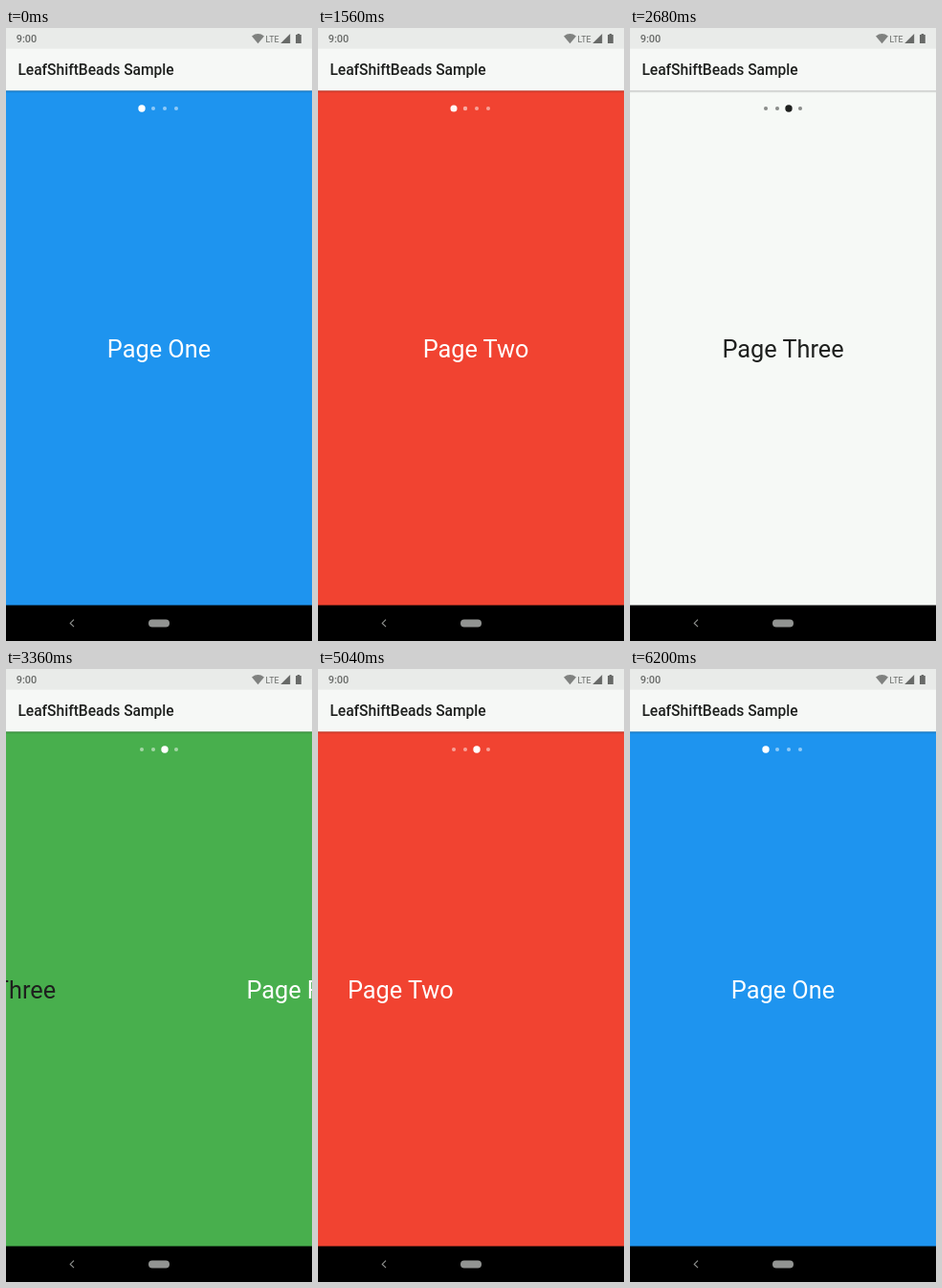
Write an HTML page that moves like this. It is 320 px wide and 640 px high and loops after 6.24 s.

```html
<!DOCTYPE html>
<html lang="en">
<head>
<meta charset="utf-8">
<title>Pager with dots</title>
<style>
  html, body { margin: 0; width: 100%; height: 100%; overflow: hidden; background: #000; }
  svg { display: block; width: 100%; height: 100%; }
  text { font-family: Roboto, "Noto Sans", sans-serif; }
  .page { font-size: 25.3px; text-anchor: middle; }
  .title { font-size: 15.57px; font-weight: 500; fill: #1d1f1d; }
  .status { font-weight: 500; fill: #686a68; }
</style>
</head>
<body>
<svg viewBox="0 0 320 640">
  <defs>
    <linearGradient id="shade" x2="0" y2="1">
      <stop offset="0" stop-opacity=".24"/>
      <stop offset="1" stop-opacity="0"/>
    </linearGradient>
  </defs>

  <rect id="back" y="65" width="320" height="538"/>
  <g id="pages"></g>
  <g id="dots"></g>

  <rect width="320" height="65.4" fill="#f6f8f6"/>
  <rect width="320" height="21.6" fill="#e9ebe9"/>
  <rect y="65.4" width="320" height="2.4" fill="url(#shade)"/>
  <text class="title" x="12.4" y="49.4">LeafShiftBeads Sample</text>

  <text class="status" x="10.8" y="15.3" font-size="10.9">9:00</text>
  <text class="status" x="271.6" y="14.5" font-size="8.8" style="font-weight:400">LTE</text>
  <g fill="#686a68">
    <path d="M257 8.4Q263.5 3.6 270 8.4L263.5 16.3Z" fill="#7f817f"/>
    <path d="M297.2 6V16H287.2Z"/>
    <path d="M304.6 6h2.6v1h1.6v9h-5.8v-9h1.6Z"/>
  </g>

  <rect y="602.6" width="320" height="37.4"/>
  <path d="M71 617.6L67.2 621.4L71 625.2" fill="none" stroke="#929492" stroke-width="1.1"/>
  <rect x="149" y="617.4" width="22" height="8" rx="4" fill="#929492"/>
</svg>
<script>
const LOOP = 6240, STEP = 40, WIDTH = 320, DOT_TIME = 300;

const pages = [
  { name: "Page One", back: "#1e94ef", ink: "#fff" },
  { name: "Page Two", back: "#f14331", ink: "#fff" },
  { name: "Page Three", back: "#f6f9f6", ink: "#1e201e" },
  { name: "Page Four", back: "#48af4d", ink: "#fff" }
];

// drag: share of the page width covered at each step until release
const swipes = [
  { from: 0, to: 1, start: 1440, end: 1800, drag: [.219, .6] },
  { from: 1, to: 2, start: 2320, end: 2680, drag: [.077, .48] },
  { from: 2, to: 3, start: 3280, end: 3680, drag: [.08, .28, .536] },
  { from: 3, to: 2, start: 4120, end: 4440, drag: [.4, .847] },
  { from: 2, to: 1, start: 4960, end: 5360, drag: [.06, .4, .77] },
  { from: 1, to: 0, start: 5840, end: 6200, drag: [.12, .55] }
];

const byId = id => document.getElementById(id);
const clamp = v => Math.min(1, Math.max(0, v));
const smooth = v => (1 - Math.cos(Math.PI * clamp(v))) / 2;

function add(parent, tag, attrs) {
  const el = document.createElementNS("http://www.w3.org/2000/svg", tag);
  for (const key in attrs) el.setAttribute(key, attrs[key]);
  return parent.appendChild(el);
}

const labels = pages.map(page => {
  const el = add(byId("pages"), "text", { class: "page", y: 343.9, fill: page.ink });
  el.textContent = page.name;
  return el;
});
const dots = pages.map((_, i) => add(byId("dots"), "circle", { cx: 142 + 12 * i, cy: 84 }));

// Follow the finger, then settle with a speed that matches the release.
function progress({ start, drag }, t) {
  const step = Math.round((t - start) / STEP);
  if (step < 0) return 0;
  if (step < drag.length) return drag[step];
  const last = drag.length - 1;
  const speed = (drag[last] - drag[last - 1]) / STEP;
  const rest = 1 - drag[last];
  const u = clamp((t - start - last * STEP) * speed / (4 * rest));
  return 1 - rest * (1 - u) ** 5;
}

function draw(t) {
  const swipe = swipes.findLast(s => t >= s.start) || swipes[0];
  const { from, to, end } = swipe;
  const pos = from + (to - from) * progress(swipe, t);
  const page = pages[Math.round(pos)];
  const picked = smooth((t - end + DOT_TIME) / DOT_TIME);

  byId("back").setAttribute("fill", page.back);
  byId("dots").setAttribute("fill", page.ink);
  labels.forEach((el, i) => el.setAttribute("x", WIDTH * (i - pos + .5)));
  dots.forEach((el, i) => {
    const on = i === to ? picked : i === from ? 1 - picked : 0;
    el.setAttribute("r", 2.05 * (1 + .8 * on));
    el.setAttribute("opacity", .5 + .5 * on);
  });
}

const origin = performance.now();
function tick() {
  const t = Math.max(0, performance.now() - origin) % LOOP;
  draw(Math.floor(t / STEP + .001) * STEP);
  requestAnimationFrame(tick);
}
tick();
</script>
</body>
</html>
```
